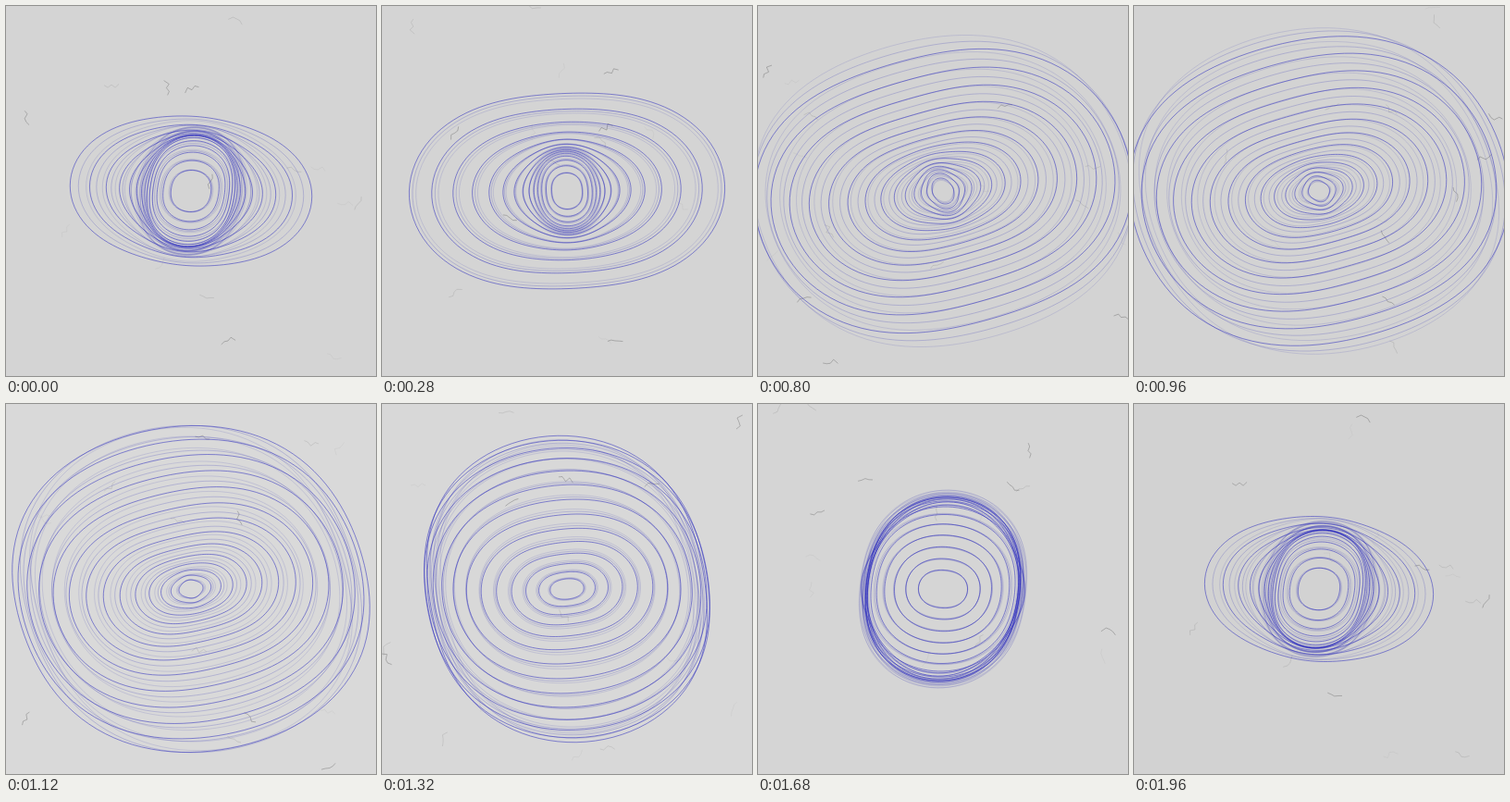
Recreate the animation shown at these times as an HTML page with a canvas. Size 400 by 400 pixels, loop 2000 ms.

```html
<!DOCTYPE html>
<html lang="en">
<head>
<meta charset="utf-8">
<title>Breathing rings</title>
<style>
  html, body { margin: 0; width: 100%; height: 100%; overflow: hidden; background: #d4d4d4; }
  canvas { display: block; width: 400px; height: 400px; }
</style>
</head>
<body>
<canvas id="stage" width="400" height="400"></canvas>
<script>
const ctx = document.getElementById('stage').getContext('2d');
const TAU = Math.PI * 2, DEG = Math.PI / 180;
const STEP = 40, STEPS = 50;
const RINGS = 14, R_MIN = 19, R_MAX = 147;

// Each layer follows the same wave with its own timing drift.
const layers = [
  { drift: 1, color: 'rgba(70,70,180,.18)' },
  { drift: 0.5, color: 'rgba(60,60,185,.27)' },
  { drift: 0, color: 'rgba(45,45,190,.6)' }
];

function seeded(seed) {
  let s = (seed * 7919 + 12345) >>> 0;
  return () => {
    s = (s + 0x6d2b79f5) >>> 0;
    let n = Math.imul(s ^ (s >>> 15), s | 1);
    n ^= n + Math.imul(n ^ (n >>> 7), n | 61);
    return ((n ^ (n >>> 14)) >>> 0) / 4294967296;
  };
}

function drawFibres(step, alpha) {
  const rnd = seeded(step + 1);
  ctx.strokeStyle = `rgba(70,70,70,${alpha})`;
  ctx.lineWidth = 0.8;
  for (let n = 0; n < 5; n++) {
    ctx.save();
    ctx.translate(rnd() * 400, rnd() * 400);
    ctx.rotate(rnd() * TAU);
    ctx.beginPath();
    for (let i = 0; i < 5; i++) ctx.lineTo(-8 + i * 4, (rnd() - 0.5) * 6);
    ctx.stroke();
    ctx.restore();
  }
}

// The wave reaches each direction at a different moment, which bends the ring.
function drawRing(k, phase, skew) {
  const r = R_MIN + (R_MAX - R_MIN) * k;
  const p = phase + 184 * DEG * k;
  ctx.beginPath();
  for (let i = 0; i < 120; i++) {
    const a = i / 120 * TAU;
    const delay = 24 * DEG * (1 - Math.cos(2 * a)) - skew * Math.sin(2 * a);
    const d = r * (1 + 0.4 * Math.cos(p - delay));
    ctx.lineTo(200 + d * Math.cos(a), 200 - 0.86 * d * Math.sin(a));
  }
  ctx.closePath();
  ctx.stroke();
}

function draw(step) {
  const a = step / STEPS * TAU;
  const g = Math.round(209 + seeded(step + 500)() * 8);
  ctx.fillStyle = `rgb(${g},${g},${g})`;
  ctx.fillRect(0, 0, 400, 400);

  // Fibres linger for two more steps while fading.
  for (let age = 0; age < 3; age++) {
    drawFibres((step - age + STEPS) % STEPS, 0.36 * 0.42 ** age);
  }

  const phase = a + 0.5 * Math.cos(a) + 41 * DEG;
  const lag = (24 * Math.cos(a + 8 * DEG) - 5) * DEG;
  const skew = 0.1 - 0.22 * Math.cos(a + 25 * DEG);
  ctx.lineWidth = 0.9;
  for (const { drift, color } of layers) {
    ctx.strokeStyle = color;
    for (let i = 0; i < RINGS; i++) drawRing(i / (RINGS - 1), phase - lag * drift, skew);
  }
}

const start = performance.now();
let shown = -1;
function tick() {
  const step = Math.floor((performance.now() - start) / STEP) % STEPS;
  if (step !== shown) draw(shown = step);
  requestAnimationFrame(tick);
}
tick();
</script>
</body>
</html>
```
